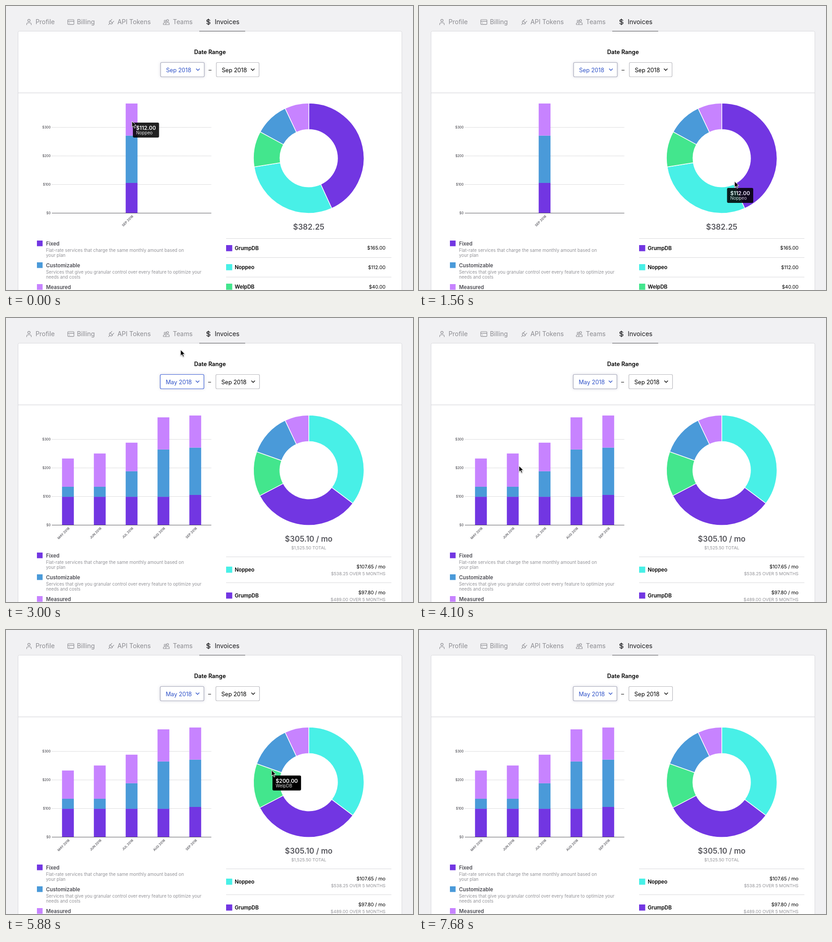
Write an HTML page that moves like this. It is 895x626 px and loops after 7.7 s.

```html
<!DOCTYPE html>
<html lang="en">
<head>
<meta charset="utf-8">
<title>Invoices</title>
<style>
  html, body { margin: 0; width: 100%; height: 100%; overflow: hidden; background: #f1f1f3; }
  svg { display: block; width: 895px; height: 626px; font-family: Inter, "Open Sans", sans-serif; }
  text { white-space: pre; }
  .tab { font-size: 13.9px; fill: #8b8b90; }
  .icon { fill: none; stroke: #8b8b90; stroke-width: 1.1; stroke-linecap: round; stroke-linejoin: round; }
  .title { font-size: 12.6px; font-weight: 600; }
  .select { font-size: 12.6px; }
  .key { font-size: 11.3px; font-weight: 600; fill: #4b4b52; }
  .note { font-size: 9.75px; fill: #929297; }
  .axis { font-size: 7.1px; font-weight: 500; fill: #4b4b52; }
  .sum { font-size: 16.8px; font-weight: 600; fill: #56565c; text-anchor: middle; }
  .sub { font-size: 9.6px; fill: #929297; }
  .name { font-size: 11.3px; font-weight: 600; }
  .cost { font-size: 10.7px; text-anchor: end; }
  .end { text-anchor: end; }
  .mid { text-anchor: middle; }
  .rule { stroke: #d9d9dc; }
  .tip-value { font-size: 11.7px; font-weight: 600; fill: #fff; }
  .tip-name { font-size: 9.7px; fill: #ddd; }
  .item { font-size: 12px; }
  #glow { filter: blur(3px); }
  #menu-box { filter: drop-shadow(0 4px 7px #0005); }
  #cursor { filter: drop-shadow(0 1px 1px #0005); }
</style>
</head>
<body>
<svg id="stage" viewBox="0 0 895 626">
  <rect width="895" height="626" fill="#f1f1f3"/>
  <rect x="26.5" y="55.5" width="844" height="590" rx="3" fill="#fff" stroke="#d8d8dc"/>
  <path d="M27 191.5H870" stroke="#dedee1" stroke-width="1.5"/>
  <path d="M425 55.5H526" stroke="#47474d"/>

  <g class="icon">
    <circle cx="50.5" cy="32" r="2.6"/>
    <path d="M45.5 41.5V40Q45.5 37 48.5 37H52.5Q55.5 37 55.5 40V41.5"/>
    <rect x="135.8" y="30" width="13.6" height="10.6" rx="1.4"/>
    <path d="M136 33.6H149M138.5 37.5H140"/>
    <path d="M225.5 41.2L228.8 37.9M228.6 32.4L234.2 38Q231 41.4 228.4 38.4Q225.6 35.6 228.6 32.4ZM230 32.4L233 29.4M234.2 36.4L237.2 33.4"/>
    <circle cx="349.8" cy="33.2" r="2"/>
    <circle cx="355.2" cy="32" r="2.3"/>
    <path d="M346 41V39Q346 37 348 37H350M351.5 41V39Q351.5 36.5 354 36.5H356.5Q359 36.5 359 39V41ZM346 41H351.5"/>
    <path d="M445 28.5V41.5M448.5 32Q447.600 30.200 445 30.200Q441.500 30.200 441.500 32.500Q441.500 34.800 445 35Q448.700 35.300 448.700 37.500Q448.700 39.900 445 39.900Q442.200 39.900 441.200 38" stroke="#17171a" stroke-width="1.400"/>
  </g>
  <g class="tab">
    <text x="65" y="39.500">Profile</text>
    <text x="156" y="39.500">Billing</text>
    <text x="245" y="39.500">API Tokens</text>
    <text x="367" y="39.500">Teams</text>
    <text x="459" y="39.500" fill="#17171a">Invoices</text>
  </g>

  <text class="title mid" x="448.500" y="106">Date Range</text>

  <g id="legend"></g>
  <g id="grid"></g>
  <g id="single"></g>
  <g id="range"></g>

  <g id="menu">
    <rect id="menu-box" x="332" y="-8" width="114" height="161" rx="5" fill="#f4f4f5" stroke="#c9c9cc"/>
    <rect id="menu-mark" x="332.500" width="113" height="17.500" fill="#3b82f6"/>
    <g id="menu-items"></g>
  </g>

  <g id="tip">
    <rect id="tip-box" height="33" rx="3"/>
    <text class="tip-value" id="tip-value" x="7" y="16"></text>
    <text class="tip-name" id="tip-name" x="7" y="26"></text>
  </g>
  <path id="cursor" d="M0 0V13.200L3.100 10.400L5.300 15.400L7.500 14.400L5.300 9.600H9.500Z" fill="#000" stroke="#fff"/>
</svg>
<script>
const LOOP = 7700, OPEN = 2200, PICK = 2900;
const PURPLE = '#7236e2', BLUE = '#4a9ad9', LILAC = '#c783ff', AQUA = '#48f0e7', GREEN = '#43e68d';
const $ = id => document.getElementById(id);
const money = n => '$' + n.toFixed(2);

const MONTHS = ['May', 'Jun', 'Jul', 'Aug', 'Sep'];
const FIXED = [98.75, 98.75, 98.75, 98.75, 105.25];
const CUSTOM = [35, 35, 89, 165, 165];
const MEASURED = [98.5, 116, 99.75, 112, 112];
const SERVICES = {
  grump: ['GrumpDB', PURPLE], noppeo: ['Noppeo', AQUA], welp: ['WelpDB', GREEN],
  bolvane: ['Bolvane', BLUE], trundix: ['Trundix', LILAC]
};
const BASE = 456.5, SCALE = 0.632, BAR = 26;
const CX = 665.7, CY = 335.5, OUTER = 121.5, INNER = 63.3;

const barX = i => 136.2 + 70 * i;
const rect = (x, y, w, h, fill) => `<rect x="${x}" y="${y}" width="${w}" height="${h}" fill="${fill}"/>`;
const text = (cls, x, y, s, more = '') => `<text class="${cls}" x="${x}" y="${y}" ${more}>${s}</text>`;
const rule = y => `<path class="rule" d="M484 ${y}H847.5"/>`;

function stack(i) {
  let y = BASE;
  return [[FIXED[i], PURPLE, 'WelpDB', 40], [CUSTOM[i], BLUE, 'GrumpDB', CUSTOM[i]],
          [MEASURED[i], LILAC, 'Noppeo', MEASURED[i]]].map(([n, fill, name, value]) => {
    const h = n * SCALE;
    y -= h;
    return { y, h, fill, name, value };
  });
}

function slices(data) {
  const total = data.reduce((s, d) => s + d[1], 0);
  let turn = 0;
  return data.map(([key, value]) => {
    const from = turn;
    turn += value / total * 360;
    const [name, fill] = SERVICES[key];
    return { from, to: turn, name, fill, value };
  });
}

const VIEWS = [
  { months: [4], slices: slices([['grump', 165], ['noppeo', 112], ['welp', 40], ['bolvane', 38.4], ['trundix', 26.85]]) },
  { months: [0, 1, 2, 3, 4], slices: slices([['noppeo', 538.25], ['grump', 489], ['welp', 200], ['bolvane', 191], ['trundix', 107.25]]) }
];

function arc({ from, to, fill }) {
  const p = (r, deg) => {
    const a = deg * Math.PI / 180;
    return `${(CX + r * Math.sin(a)).toFixed(2)} ${(CY - r * Math.cos(a)).toFixed(2)}`;
  };
  const big = to - from > 180 ? 1 : 0;
  return `<path d="M${p(OUTER, from)}A${OUTER} ${OUTER} 0 ${big} 1 ${p(OUTER, to)}L${p(INNER, to)}` +
    `A${INNER} ${INNER} 0 ${big} 0 ${p(INNER, from)}Z" fill="${fill}" stroke="#fff" stroke-width="1.4"/>`;
}

function selectBox(x, w, label, first) {
  const ink = first ? '#2f52c8' : '#000';
  const arrow = x + w - 14;
  return (first ? `<rect id="glow" x="${x - 1}" y="124" width="${w + 2}" height="33" rx="4" fill="#dcdce4"/>` : '') +
    `<rect ${first ? 'class="focus"' : ''} x="${x}" y="124.5" width="${w}" height="31.5" rx="2.5" fill="#fff" stroke="#b9b9be" stroke-width="1.2"/>` +
    text('select', x + 12, 146, label, `fill="${ink}"`) +
    `<path d="M${arrow - 3.5} 138.5l3.5 3.5l3.5 -3.5" fill="none" stroke="${ink}" stroke-width="1.4" stroke-linecap="round"/>`;
}

function chart(view) {
  return view.months.map(i => {
    const x = barX(view.months.length === 1 ? 2 : i);
    return stack(i).map(s => rect(x - BAR / 2, s.y, BAR, s.h, s.fill)).join('') +
      text('axis end', 0, 0, MONTHS[i].toUpperCase() + ' 2018', `transform="translate(${x + 4.2} 464) rotate(-45)"`);
  }).join('') + `<path d="M101 ${BASE}H451.5" stroke="#5a5a60"/>` + view.slices.map(arc).join('');
}

function build() {
  const [one, many] = VIEWS;

  $('grid').innerHTML = [0, 1, 2, 3].map(n => {
    const y = BASE - 63.1 * n;
    return (n ? `<path d="M101 ${Math.floor(y) + 0.5}H451.5" stroke="#bcbcc0" stroke-dasharray="1 1"/>` : '') +
      text('axis end', 98, y + 2.6, '$' + n * 100);
  }).join('');

  $('legend').innerHTML = [
    [PURPLE, 'Fixed', 'Flat-rate services that charge the same monthly amount based on', 'your plan'],
    [BLUE, 'Customizable', 'Services that give you granular control over every feature to optimize your', 'needs and costs'],
    [LILAC, 'Measured', '', '']
  ].map(([fill, name, a, b], i) => {
    const y = 517 + 48 * i;
    return rect(68, y, 12.5, 12.5, fill) + text('key', 88, y + 10.8, name) +
      text('note', 88, y + 24.7, a) + text('note', 88, y + 35.8, b);
  }).join('');

  $('single').innerHTML = selectBox(340, 96, 'Sep 2018', true) + text('select', 445.5, 145, '–') +
    selectBox(462.5, 94, 'Sep 2018') + chart(one) + text('sum', 665.7, 492.5, '$382.25') +
    one.slices.slice(0, 3).map((s, i) => {
      const y = 512 + 42.6 * i;
      return rule(Math.floor(y) + 0.5) + rect(484, Math.round(y + 14.8), 13.5, 13.5, s.fill) +
        text('name', 503, y + 25.7, s.name) + text('cost', 834.5, y + 25.4, money(s.value));
    }).join('');

  $('range').innerHTML = selectBox(339.2, 96, 'May 2018', true) + text('select', 444.5, 145, '–') +
    selectBox(461.5, 96, 'Sep 2018') + chart(many) + text('sum', 665.7, 492.5, '$305.10 / mo') +
    text('sub mid', 665.7, 509.5, '$1,525.50 TOTAL') +
    many.slices.slice(0, 2).map((s, i) => {
      const y = 526.5 + 57 * i;
      return rule(y) + rect(484, y + 21.5, 13.5, 13.5, s.fill) + text('name', 503, y + 32.7, s.name) +
        text('cost', 834.5, y + 25.6, money(s.value / 5) + ' / mo') +
        text('sub end', 834.5, y + 40.2, money(s.value) + ' OVER 5 MONTHS');
    }).join('');

  $('menu-items').innerHTML = ['Jan', 'Feb', 'Mar', 'Apr', ...MONTHS].map((m, i) =>
    text('item', 351, 5 + 17.5 * i, m + ' 2018')).join('') +
    '<path d="M338 141l3 3.5l5 -8" fill="none" stroke="#222" stroke-width="1.5"/>';
}

// Pointer path: time, x, y
const PATH = [
  [0, 277, 254], [200, 277, 256], [500, 277, 322], [780, 279, 415], [1000, 380, 436], [1200, 560, 424],
  [1350, 620, 418], [1430, 650, 411], [1500, 675, 398], [1535, 689, 395.5], [1560, 694, 387],
  [1720, 610, 310], [1900, 450, 180], [2050, 388, 142], [2280, 388, 141], [2600, 384, 72], [3150, 384, 70],
  [3450, 320, 120], [3700, 240, 230], [3900, 229, 300], [4100, 220, 326], [4250, 232, 330], [4450, 280, 320],
  [4620, 338, 290], [4760, 346, 290], [4800, 348, 307], [4950, 354, 330], [5150, 416, 335], [5350, 500, 348],
  [5550, 572, 346], [5700, 580, 335], [5840, 584, 318], [5880, 584, 309], [6000, 594, 286], [6150, 636, 252],
  [6350, 725, 280], [6500, 740, 325], [6650, 690, 245], [6800, 480, 190], [7000, 100, 180], [7090, 9, 177], [7160, -60, 176]
];

function pointer(t) {
  if (t <= 0) return PATH[0].slice(1);
  const i = PATH.findIndex(p => p[0] > t);
  if (i < 0) return PATH.at(-1).slice(1);
  const a = PATH[i - 1], b = PATH[i], before = PATH[i - 2] || a, after = PATH[i + 1] || b;
  const d = b[0] - a[0], u = (t - a[0]) / d;
  return [1, 2].map(k => {
    // Limited tangents keep the path from overshooting
    const s = (b[k] - a[k]) / d;
    const s0 = (a[k] - before[k]) / (a[0] - before[0] || 1);
    const s1 = (after[k] - b[k]) / (after[0] - b[0] || 1);
    const slope = (p, q) => p * q > 0 ? 2 * p * q / (p + q) : 0;
    const m0 = slope(s0, s) * d, m1 = slope(s, s1) * d;
    const u2 = u * u, u3 = u2 * u;
    return (2 * u3 - 3 * u2 + 1) * a[k] + (u3 - 2 * u2 + u) * m0 + (3 * u2 - 2 * u3) * b[k] + (u3 - u2) * m1;
  });
}

function hit(t) {
  if (t < -120) return null;
  const view = VIEWS[t < PICK ? 0 : 1], [x, y] = pointer(t);
  const r = Math.hypot(x - CX, y - CY);
  if (r > 62 && r < OUTER) {
    const deg = (Math.atan2(x - CX, CY - y) * 180 / Math.PI + 360) % 360;
    return view.slices.find(s => deg >= s.from && deg < s.to);
  }
  const i = view.months.find(m => Math.abs(x - barX(view.months.length === 1 ? 2 : m)) < BAR / 2);
  return i === undefined ? null : stack(i).find(s => y >= s.y && y < s.y + s.h);
}

// The tip fades with the share of recent time spent over a shape
function drawTip(t) {
  const steps = 15;
  let found, at, seen = 0;
  for (let i = 0; i < steps; i++) {
    const h = hit(t - i * 10);
    if (!h) continue;
    seen++;
    if (!found) { found = h; at = t - i * 10; }
  }
  $('tip').setAttribute('opacity', seen / steps);
  if (!found) return;
  $('tip-value').textContent = money(found.value);
  $('tip-name').textContent = found.name;
  const w = Math.max($('tip-value').getComputedTextLength(), $('tip-name').getComputedTextLength());
  $('tip-box').setAttribute('width', w + 14);
  const [x, y] = pointer(at - 40);
  $('tip').setAttribute('transform', `translate(${x + 2} ${y + 3})`);
}

const show = (id, on) => $(id).setAttribute('display', on ? 'inline' : 'none');

function frame() {
  const t = performance.now() % LOOP;
  const [x, y] = pointer(t);
  show('single', t < PICK);
  show('range', t >= PICK);

  const hover = t > 2020 && t < 3180;
  document.querySelectorAll('.focus').forEach(el => el.setAttribute('stroke', hover ? '#3f62d8' : '#a6a8ba'));

  show('menu', t >= OPEN && t < PICK);
  const row = Math.max(0, Math.min(8, Math.round((y - 1) / 17.5)));
  $('menu-mark').setAttribute('y', row * 17.5 - 8);
  $('menu-items').querySelectorAll('text').forEach((el, i) => el.setAttribute('fill', i === row ? '#fff' : '#17171a'));

  drawTip(t);
  $('cursor').setAttribute('transform', `translate(${x} ${y})`);
  requestAnimationFrame(frame);
}

build();
frame();
</script>
</body>
</html>
```
